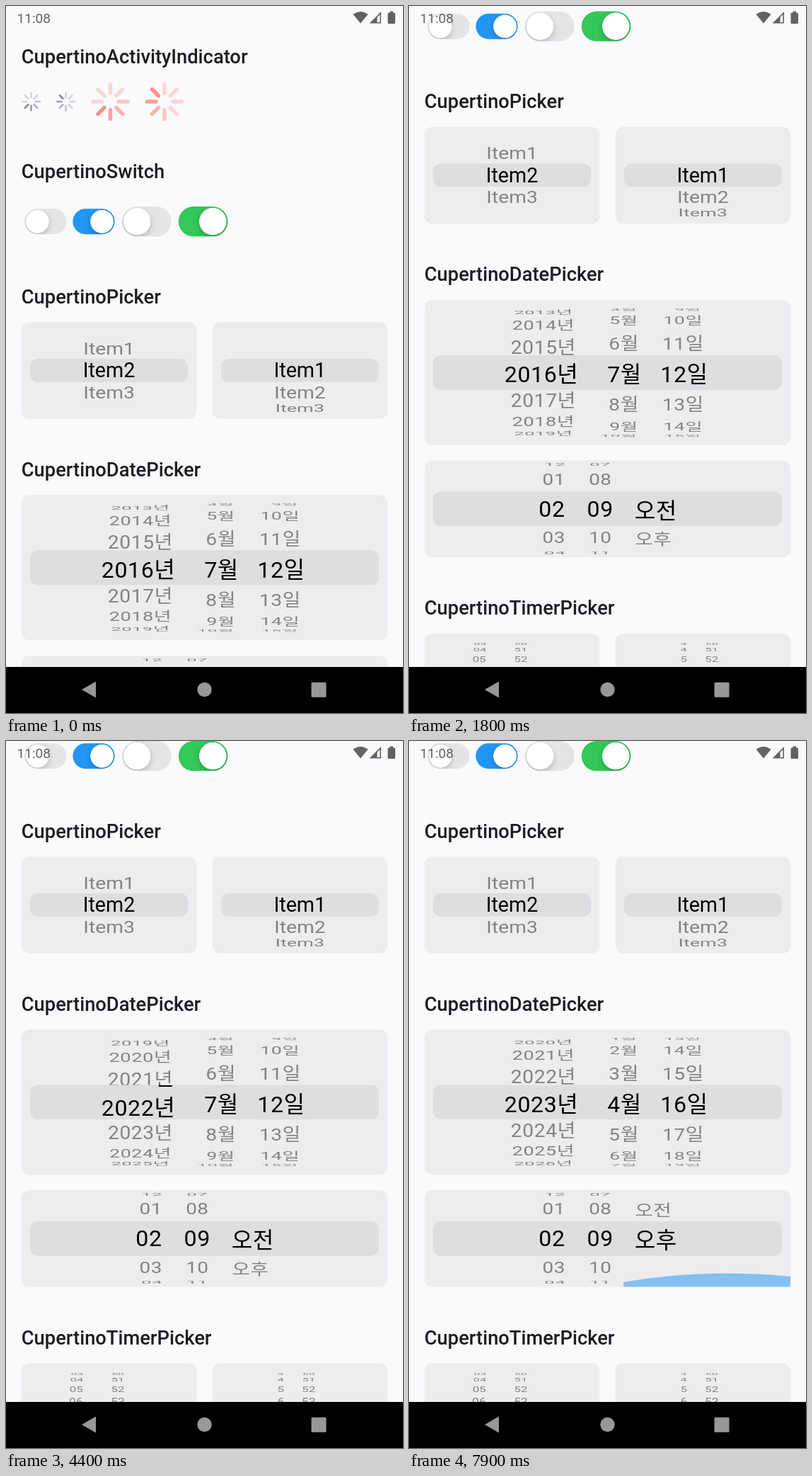
An HTML page with a canvas that plays this animation: 561 by 998 pixels, repeating every 8000 ms.

```html
<!DOCTYPE html>
<html lang="ko">
<head>
<meta charset="utf-8">
<title>Cupertino widgets</title>
<style>
  html, body { margin: 0; width: 100%; height: 100%; overflow: hidden; background: #faf9fc; }
  canvas { display: block; width: 561px; height: 998px; }
</style>
</head>
<body>
<canvas id="stage"></canvas>
<script>
const WIDTH = 561, HEIGHT = 998, LOOP = 8000, FRAME = 100;
const BACKGROUND = '#faf9fc', PANEL = '#edecee', BAR = '#dedde0', STATUS = '#626164';
const FONT = 'Roboto, "Noto Sans CJK KR", "Noto Sans CJK", sans-serif';
const PERSPECTIVE = 0.0022;

const canvas = document.getElementById('stage');
const ctx = canvas.getContext('2d');
const ratio = window.devicePixelRatio || 1;
canvas.width = WIDTH * ratio;
canvas.height = HEIGHT * ratio;

const linear = u => u;
const easeOut = u => 1 - (1 - u) ** 3;
const easeInOut = u => u * u * (3 - 2 * u);
const wrap = (n, size) => ((n - 1) % size + size) % size + 1;
const pad = n => String(n).padStart(2, '0');

// Value at time t along [time, value, easing into this point] stops.
function track(t, stops) {
  if (t <= stops[0][0]) return stops[0][1];
  for (let i = 1; i < stops.length; i++) {
    const [t0, v0] = stops[i - 1], [t1, v1, ease = linear] = stops[i];
    if (t <= t1) return v0 + (v1 - v0) * ease((t - t0) / (t1 - t0));
  }
  return stops[stops.length - 1][1];
}

const scrollStops = [[900, 0], [1100, 9], [1200, 19], [1300, 32], [1400, 90], [1500, 168],
  [1600, 222], [1700, 256], [1800, 275.5], [1900, 283]];
const yearStops = [[2100, 2016], [2900, 2019, easeOut], [3800, 2019],
  [4400, 2021.89, easeOut], [4500, 2021.89], [5300, 2023, easeInOut]];
const monthStops = [[5400, 7], [6100, 4, easeOut]];
const dayStops = [[6200, 12], [7100, 16, easeOut]];
const halfDayStops = [[7200, 0], [7700, 1, easeOut]];
const glowStops = [[7500, 0], [7900, 19.2, easeOut]];

function roundRect(x, y, w, h, r, color) {
  ctx.fillStyle = color;
  ctx.beginPath();
  ctx.roundRect(x, y, w, h, r);
  ctx.fill();
}

function polygon(color, ...points) {
  ctx.fillStyle = color;
  ctx.beginPath();
  points.forEach(([x, y]) => ctx.lineTo(x, y));
  ctx.closePath();
  ctx.fill();
}

function disc(x, y, r, color) {
  ctx.fillStyle = color;
  ctx.beginPath();
  ctx.arc(x, y, r, 0, Math.PI * 2);
  ctx.fill();
}

function title(text, baseline) {
  ctx.font = `500 27.3px ${FONT}`;
  ctx.textAlign = 'left';
  ctx.fillStyle = '#1c1b1f';
  ctx.fillText(text, 21.8, baseline);
}

function spinner(x, y, r, color, tick) {
  const alphas = [47, 47, 47, 47, 72, 97, 122, 147];
  ctx.save();
  ctx.translate(x, y);
  for (let i = 0; i < 8; i++) {
    ctx.globalAlpha = alphas[(i - tick + 8) % 8] / 255;
    roundRect(-r / 10, -r, r / 5, r * 2 / 3, r / 10, color);
    ctx.rotate(Math.PI / 4);
  }
  ctx.restore();
}

function toggle(x, y, scale, on, color) {
  const w = 69.6 * scale, h = 42.3 * scale, r = 19.1 * scale;
  const thumbX = on ? x + w - h / 2 : x + h / 2;
  roundRect(x, y - h / 2, w, h, h / 2, on ? color : '#e5e4e7');
  ctx.save();
  ctx.beginPath();
  ctx.roundRect(x, y - h / 2, w, h, h / 2);
  ctx.clip();
  ctx.shadowColor = 'rgba(0,0,0,.2)';
  ctx.shadowBlur = 10 * scale * ratio;
  ctx.shadowOffsetY = 4 * scale * ratio;
  disc(thumbX, y, r, '#fff');
  ctx.restore();
  disc(thumbX, y, r + 0.6, 'rgba(0,0,0,.04)');
  disc(thumbX, y, r, '#fff');
}

function panel(x, y, w, h, barHeight) {
  roundRect(x, y, w, h, 10.9, PANEL);
  if (barHeight) roundRect(x + 12.3, y + (h - barHeight) / 2, w - 24.6, barHeight, 10.9, BAR);
}

// One column of a cylinder picker; the centre band is drawn magnified and opaque.
function wheel(o) {
  const { y, h, step, value, label, right, pivot } = o;
  const { reach = 3, band = 48.9, zoom = 1.119, zoomRight = right } = o;
  const { size = 28.7, lift = 0.342, spacing = 0.55 } = o;
  const radius = h * 0.535;

  function items() {
    const middle = Math.round(value);
    for (let n = middle - reach - 1; n <= middle + reach + 1; n++) {
      const angle = (n - value) * step, text = label(n);
      if (!text || Math.abs(n - value) >= reach + 0.9 || Math.abs(angle) > 1.5) continue;
      const sin = Math.sin(angle), cos = Math.cos(angle);
      const depth = 1 + PERSPECTIVE * radius * (1 - cos);
      const squash = cos / depth - PERSPECTIVE * radius * sin * sin / depth ** 2;
      if (squash <= 0) continue;
      ctx.save();
      ctx.translate(pivot, y + radius * sin / depth);
      ctx.scale(1 / depth, squash);
      ctx.fillText(text, right - pivot, lift * size);
      ctx.restore();
    }
  }

  ctx.save();
  ctx.font = `400 ${size}px ${FONT}`;
  ctx.letterSpacing = spacing + 'px';
  ctx.textAlign = 'right';

  ctx.save();
  ctx.beginPath();
  ctx.rect(0, y - h / 2, WIDTH, h);
  ctx.rect(0, y - band / 2, WIDTH, band);
  ctx.clip('evenodd');
  ctx.fillStyle = 'rgba(0,0,0,.447)';
  items();
  ctx.restore();

  ctx.beginPath();
  ctx.rect(0, y - band / 2, WIDTH, band);
  ctx.clip();
  ctx.translate(zoomRight, y);
  ctx.scale(zoom, zoom);
  ctx.translate(-right, -y);
  ctx.fillStyle = '#000';
  items();
  ctx.restore();
}

function itemPicker(x, selected) {
  const center = x + 123.75;
  panel(x, 446.2, 247.5, 136.5, 32.8);
  wheel({
    y: 514.4, h: 136.5, step: 0.445, value: selected, reach: 2, band: 32.8, zoom: 1, spacing: 0,
    label: n => n >= 1 && n <= 3 && 'Item' + n, right: center + 36.8, pivot: center
  });
}

function datePicker(t) {
  panel(21.8, 690.5, 517.4, 204.75, 48.9);
  const base = { y: 792.9, h: 204.75, step: 0.412, lift: 0.436 };
  wheel({ ...base, step: 0.3575, value: track(t, yearStops), label: n => n + '년',
    right: 236.8, pivot: 190, zoomRight: 239.5 });
  wheel({ ...base, value: track(t, monthStops), label: n => wrap(n, 12) + '월',
    right: 325.5, pivot: 302, zoomRight: 329 });
  wheel({ ...base, value: track(t, dayStops), label: n => wrap(n, 31) + '일',
    right: 417.7, pivot: 382, zoomRight: 422.7 });
}

function timePicker(t) {
  const bottom = 1053.6;
  panel(21.8, 917.1, 517.4, 136.5, 48.9);
  const base = { y: 985.3, h: 136.5, step: 0.618, reach: 2 };
  wheel({ ...base, value: 2, label: n => pad(wrap(n, 12)), right: 220.8, pivot: 225, zoomRight: 220.6 });
  wheel({ ...base, value: 9, label: pad, right: 287, pivot: 270, zoomRight: 288.9 });
  wheel({ ...base, value: track(t, halfDayStops), label: n => ['오전', '오후'][n], lift: 0.436,
    right: 373.6, pivot: 300, zoomRight: 379 });

  const glow = track(t, glowStops);
  if (glow > 0) {
    ctx.save();
    ctx.beginPath();
    ctx.rect(303, 917, 236.2, bottom - 917);
    ctx.clip();
    disc(450, bottom - glow + 870, 870, 'rgba(33,150,243,.5)');
    ctx.restore();
  }
}

function timerPicker(x, hourLabel, hourRight, hourPivot, minuteRight) {
  panel(x, 1161.4, 247.5, 204.75, 36);
  const base = { y: 1263.8, h: 204.75, step: 0.23, reach: 5, band: 36, size: 18, spacing: 0 };
  wheel({ ...base, value: 8, label: hourLabel, right: hourRight, pivot: hourPivot });
  wheel({ ...base, value: 55, label: n => pad(n % 60), right: minuteRight, pivot: minuteRight - 10 });
}

function page(t) {
  title('CupertinoActivityIndicator', 81);
  const tick = Math.floor(6.2 + t / 125) % 8;
  spinner(35.5, 135, 13.65, '#3c3c44', tick);
  spinner(84.6, 135, 13.65, '#3c3c44', 0);
  spinner(147.4, 135, 27.3, '#f44336', tick);
  spinner(223.8, 135, 27.3, '#f44336', 0);

  title('CupertinoSwitch', 243);
  toggle(26.4, 304.2, 0.85, false);
  toggle(94.4, 304.2, 0.85, true, '#2196f3');
  toggle(164, 304.2, 1, false);
  toggle(243.8, 304.2, 1, true, '#34c759');

  title('CupertinoPicker', 419.5);
  itemPicker(21.8, 2);
  itemPicker(291.6, 1);

  title('CupertinoDatePicker', 663.5);
  datePicker(t);
  timePicker(t);

  title('CupertinoTimerPicker', 1134.5);
  timerPicker(21.8, pad, 108.6, 115, 168.2);
  timerPicker(291.6, String, 393.5, 385, 437.8);
}

function statusBar() {
  ctx.font = `400 19.1px ${FONT}`;
  ctx.textAlign = 'left';
  ctx.fillStyle = STATUS;
  ctx.fillText('11:08', 15.5, 24);

  ctx.beginPath();
  ctx.moveTo(501, 24.5);
  ctx.lineTo(490.5, 11.8);
  ctx.quadraticCurveTo(501, 4, 511.5, 11.8);
  ctx.fill();

  polygon(STATUS, [513.5, 24.5], [530, 24.5], [530, 8]);
  polygon(BACKGROUND, [524.5, 16], [528.4, 12], [528.4, 23], [524.5, 23]);
  roundRect(539.5, 9.5, 10.5, 15.5, 1.5, STATUS);
  ctx.fillRect(542.5, 7.5, 4.5, 3);
}

function navigationBar() {
  const gray = '#999799';
  ctx.fillStyle = '#000';
  ctx.fillRect(0, 933, WIDTH, 65);
  polygon(gray, [107, 965], [127, 953.5], [127, 976.5]);
  disc(280.5, 965, 10.2, gray);
  roundRect(431.5, 954.7, 21, 21, 1.5, gray);
}

function draw(now) {
  const t = Math.floor(now % LOOP / FRAME) * FRAME;
  ctx.setTransform(ratio, 0, 0, ratio, 0, 0);
  ctx.fillStyle = BACKGROUND;
  ctx.fillRect(0, 0, WIDTH, HEIGHT);
  ctx.save();
  ctx.translate(0, -track(t, scrollStops));
  page(t);
  ctx.restore();
  statusBar();
  navigationBar();
}

const start = performance.now();
function loop() {
  draw(performance.now() - start);
  requestAnimationFrame(loop);
}
loop();
</script>
</body>
</html>
```
